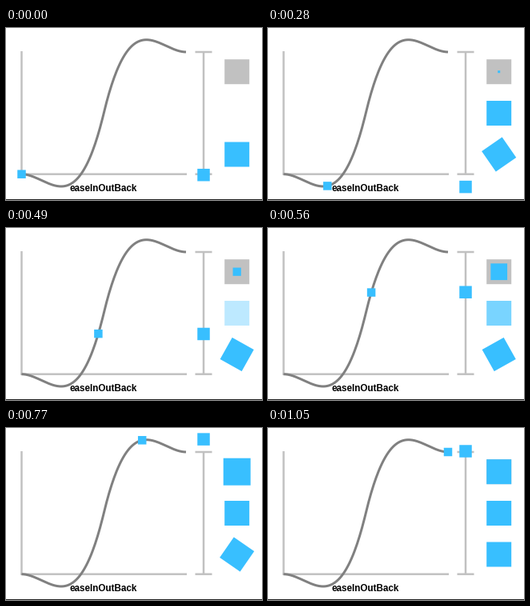
Write a matplotlib script that moves like this. It is 320 px wide and 215 px high and loops after 1.12 s.

```python
import numpy as np
import matplotlib.pyplot as plt
from matplotlib.animation import FuncAnimation
from matplotlib.patches import Polygon

W, H, DPI = 320, 215, 100
FRAMES, INTERVAL = 16, 70
BLUE, LIGHT, DARK = "#38bfff", "#c1c1c1", "#808080"
PX = 72 / DPI

X0, X1 = 19.5, 225
Y0, Y1 = 182.7, 30
BAR_X = 247
BOX_X, BOX = 288.7, 31


def ease_in_out_back(t, c=1.70158 * 1.525):
    t = np.asarray(t, dtype=float)
    u, w = 2 * t, 2 * t - 2
    return np.where(t < 0.5,
                    u * u * ((c + 1) * u - c) / 2,
                    (w * w * ((c + 1) * w + c) + 2) / 2)


def square(cx, cy, size, turn=0.0):
    a = 2 * np.pi * turn
    pts = np.array([[-1, -1], [1, -1], [1, 1], [-1, 1]]) * size / 2
    rot = np.array([[np.cos(a), np.sin(a)], [-np.sin(a), np.cos(a)]])
    return pts @ rot + (cx, cy)


fig = plt.figure(figsize=(W / DPI, H / DPI), dpi=DPI, facecolor="white")
ax = fig.add_axes([0, 0, 1, 1])
ax.set(xlim=(0, W), ylim=(H, 0))
ax.axis("off")


def line(xs, ys, color=LIGHT, width=2.5):
    ax.plot(xs, ys, color=color, lw=width * PX, solid_capstyle="butt",
            zorder=1, snap=False)


def add_square(cx, cy, size, color=BLUE, z=3):
    patch = Polygon(square(cx, cy, size), fc=color, ec="none", lw=0,
                    zorder=z, snap=False)
    return ax.add_patch(patch)


line([X0, X0], [29, Y0 + 1])
line([X0 - 1, 226], [Y0, Y0])
line([BAR_X, BAR_X], [Y1, Y0])
for y in (Y1, Y0):
    line([BAR_X - 10.5, BAR_X + 10.5], [y, y])
line([0, W], [H - 0.5, H - 0.5], "#202020", 1)

t = np.linspace(0, 1, 200)
line(X0 + (X1 - X0) * t, Y0 + (Y1 - Y0) * ease_in_out_back(t), DARK, 3)

ax.text(80, 204.5, "easeInOutBack", family="Liberation Sans", weight="bold",
        size=11.6 * PX, color="black", va="baseline", zorder=2)

add_square(BOX_X, 54.7, BOX, LIGHT, 2)
scaler = add_square(BOX_X, 54.7, BOX)
fader = add_square(BOX_X, 106.5, BOX)
spinner = add_square(BOX_X, 158, BOX)
marker = add_square(X0, Y0, 10.5)
slider = add_square(BAR_X, 183.5, 15.5)


def update(i):
    p = i / (FRAMES - 1)
    v = float(ease_in_out_back(p))
    marker.set_xy(square(X0 + (X1 - X0) * p, Y0 + (Y1 - Y0) * v, 10.5))
    slider.set_xy(square(BAR_X, 183.7 - 154.7 * v, 15.5))
    scaler.set_xy(square(BOX_X, 54.7, BOX * abs(v)))
    # an opacity below zero counts as opaque
    fader.set_alpha(1 if v < 0 else min(v, 1))
    spinner.set_xy(square(BOX_X, 158, BOX, v))
    return marker, slider, scaler, fader, spinner


anim = FuncAnimation(fig, update, frames=FRAMES, interval=INTERVAL,
                     repeat=True, repeat_delay=0)
plt.show()
```
